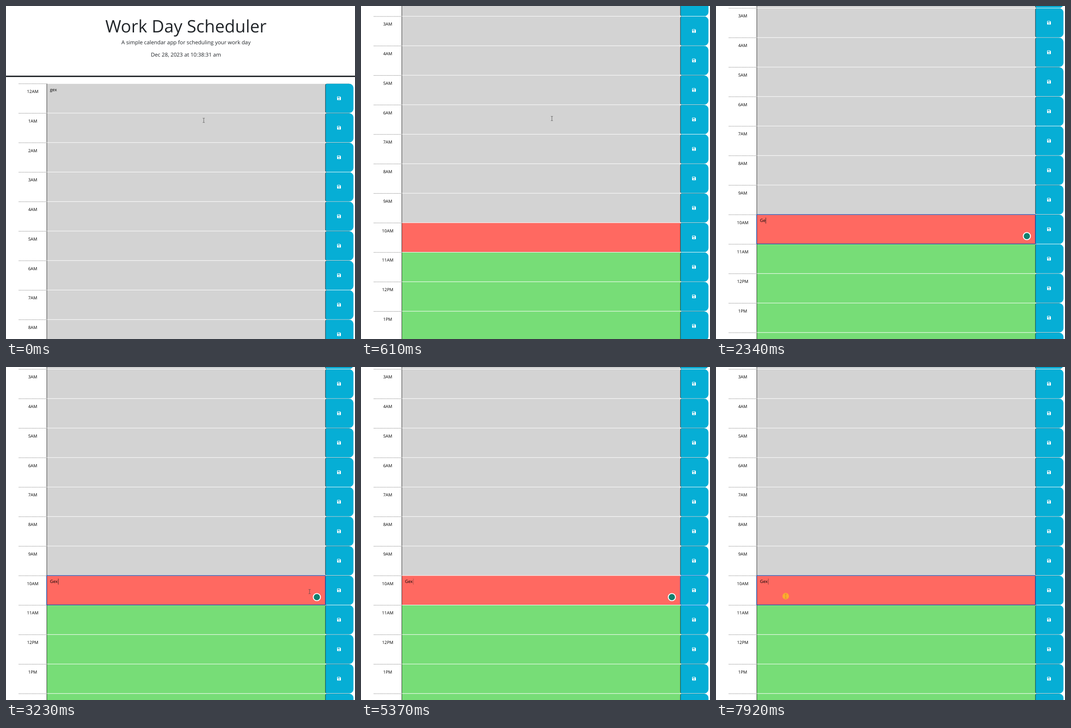
These frames come from a looping animation (766x731 px, 7.99 s). An HTML page:

```html
<!DOCTYPE html>
<html lang="en">
<head>
<meta charset="utf-8">
<title>Work Day Scheduler</title>
<style>
  html, body { margin: 0; width: 100%; height: 100%; overflow: hidden; background: #fff; }
  svg { display: block; width: 766px; height: 731px; }
  text { font-family: "Open Sans", "Noto Sans", sans-serif; font-size: 9.42px; text-rendering: geometricPrecision; }
  .head { fill: #212529; text-anchor: middle; font-size: 11.77px; }
  .title { font-size: 37.67px; }
  .hour { text-anchor: middle; }
</style>
</head>
<body>
<svg id="stage" viewBox="0 0 766 731" xmlns="http://www.w3.org/2000/svg"></svg>
<script>
const LOOP = 7990, STEP = 70;
const ROW_TOP = 170.3, ROW_H = 64.75, NOW = 10;
const LEFT = 28.2, AREA = 89.4, BTN = 700.7, RIGHT = 761.8;
const stage = document.getElementById('stage');

function add(parent, tag, attrs, text) {
  const el = document.createElementNS('http://www.w3.org/2000/svg', tag);
  for (const k in attrs) el.setAttribute(k, attrs[k]);
  if (text) el.textContent = text;
  parent.appendChild(el);
  return el;
}
const show = (el, on) => el.setAttribute('visibility', on ? 'visible' : 'hidden');
const move = (el, x, y) => el.setAttribute('transform', `translate(${x} ${y})`);

// Page header
const page = add(stage, 'g', {});
add(page, 'text', { class: 'head title', x: 395, y: 57.8 }, 'Work Day Scheduler');
add(page, 'text', { class: 'head', x: 395, y: 83.6 }, 'A simple calendar app for scheduling your work day');
const clock = add(page, 'text', { class: 'head', x: 395, y: 110.7 }, ' ');
add(page, 'rect', { x: 0, y: 152.9, width: 766, height: 3, fill: '#212529' });

// Hour rows
function buttonShape(y, h) {
  const l = 3.4, r = 8.8;
  return `M${BTN + l} ${y}H${RIGHT - r}a${r} ${r} 0 0 1 ${r} ${r}v${h - 2 * r}a${r} ${r} 0 0 1 ${-r} ${r}` +
    `H${BTN + l}a${l} ${l} 0 0 1 ${-l} ${-l}v${2 * l - h}a${l} ${l} 0 0 1 ${l} ${-l}z`;
}
const DISK = 'M-3.2-4.1H2.2L4.1-2.2V3.2a.9.9 0 0 1-.9.9H-3.2a.9.9 0 0 1-.9-.9V-3.2a.9.9 0 0 1 .9-.9z' +
  'M-2.9-2.9V-.7H1.7V-2.9zM0 .6a1.2 1.2 0 1 0 .01 0z';
const icons = [];
for (let i = 0; i < 16; i++) {
  const y = ROW_TOP + i * ROW_H;
  const fill = i < NOW ? '#d3d3d3' : i === NOW ? '#ff6961' : '#77dd77';
  const label = (i % 12 || 12) + (i < 12 ? 'AM' : 'PM');
  add(page, 'path', { d: `M${LEFT} ${y + .4}H${AREA}`, stroke: '#444', 'stroke-width': .8, 'stroke-dasharray': '1.6 1.6' });
  add(page, 'text', { class: 'hour', x: 58.6, y: y + 20.9 }, label);
  add(page, 'rect', { x: AREA, y, width: BTN - AREA + .6, height: ROW_H, fill });
  add(page, 'path', { d: `M${AREA} ${y}H${RIGHT}`, stroke: '#fff', 'stroke-width': 1 });
  add(page, 'rect', { x: AREA - .2, y, width: .9, height: ROW_H, fill: '#222' });
  add(page, 'path', { d: buttonShape(y + .5, ROW_H - .9), fill: '#111' });
  add(page, 'path', { d: buttonShape(y + .5, ROW_H - .9), fill: '#06aed5', transform: 'translate(.8 0)' });
  icons.push(add(page, 'path', { d: DISK, 'fill-rule': 'evenodd', fill: '#fff', transform: `translate(730.9 ${y + 32.2})` }));
}
add(page, 'text', { x: 96.4, y: ROW_TOP + 16.5 }, 'gex');

// Editing parts of the current hour
const nowY = ROW_TOP + NOW * ROW_H;
const entry = add(page, 'text', { x: 96.6, y: nowY + 16.5 });
const caret = add(page, 'rect', { y: nowY + 6.8, width: .9, height: 13, fill: '#222' });
const focus = add(page, 'rect', { x: AREA - .2, y: nowY, width: BTN - AREA + .6, height: ROW_H - .2, fill: 'none', stroke: '#1450b8', 'stroke-width': 1.3 });
const ring = add(page, 'path', { d: buttonShape(nowY - .7, ROW_H + 1.4), fill: 'none', stroke: '#3184fd', 'stroke-width': 2.4, opacity: .32 });
const badge = add(page, 'circle', { cx: 682.3, cy: nowY + 47.3, r: 7.9, fill: '#11806f', stroke: '#fff', 'stroke-width': 2 });

// Pointer
const pulse = add(stage, 'circle', { r: 7.2, fill: '#ffab2e' });
const beam = add(stage, 'path', { d: 'M-2.2-4.7H-.6L0-4.2.6-4.7H2.2M0-4.2V4.2M-2.2 4.7H-.6L0 4.2.6 4.7H2.2', fill: 'none', stroke: '#444', 'stroke-width': .8 });
const hand = add(stage, 'path', {
  d: 'M-2.4 1.5V-5.2a1.1 1.1 0 0 1 2.2 0V-1.6q1-.8 1.9.2 1-.6 1.6.3 1.5-.3 1.5 1.2V3q0 1.4-1 2.6V7H-1.6V6L-5 1.8q-.6-1.4.6-1.6 1.1.2 2 1.3z',
  fill: '#fff', stroke: '#222', 'stroke-width': .8
});

// Timelines: [start, value...]
const scrolls = [[0, 0], [540, 52.2], [610, 342], [680, 352], [750, 357], [820, 360]];
const typed = [[0, ''], [1920, 'G'], [2200, 'Ge'], [2470, 'Gex']];
const paths = [
  [[0, 434, 251], [70, 427, 249], [140, 419, 247], [820, 419, 247], [1300, 138, 473], [1640, 138, 473]],
  [[2470, 138, 473], [2740, 138, 473], [3160, 627, 494], [3370, 745, 491], [3570, 745, 491], [3710, 719, 496],
   [4320, 719, 496], [4530, 654, 461], [4740, 600, 219], [4810, 600, 219]],
  [[6820, 238, 199], [7160, 160, 516], [7300, 128, 508], [7440, 169, 506], [7580, 153, 503], [LOOP, 153, 503]]
];
const caretX = { '': 96.8, G: 103.6, Ge: 108.8, Gex: 114.4 };

const current = (list, t) => list.filter(k => k[0] <= t).pop();
const between = (t, a, b) => t >= a && t < b;

function pointerAt(t) {
  const path = paths.find(p => between(t, p[0][0], p[p.length - 1][0]));
  if (!path) return null;
  const i = path.findIndex(k => k[0] > t), a = path[i - 1], b = path[i];
  const u = Math.floor((t - a[0]) / STEP) * STEP / (b[0] - a[0]);
  return [a[1] + (b[1] - a[1]) * u, a[2] + (b[2] - a[2]) * u];
}

function draw(t) {
  move(page, 0, -current(scrolls, t)[1]);
  clock.textContent = `Dec 28, 2023 at 10:38:${t < 340 ? 31 : 32} am`;

  const word = current(typed, t)[1];
  entry.textContent = word;
  caret.setAttribute('x', caretX[word]);
  caret.setAttribute('opacity', t < 4110 ? 1 : t < 7650 ? .4 : .65);
  show(caret, t >= 1440);
  show(focus, between(t, 1370, 4110) || t >= 7650);
  show(ring, between(t, 4250, 6490));
  show(badge, between(t, 1780, 6490));

  const p = pointerAt(t);
  const onButton = !!p && p[0] > BTN && p[0] < RIGHT;
  show(beam, p && !onButton);
  show(hand, onButton);
  show(pulse, between(t, 1370, 1640) || t >= 7650);
  icons[NOW].setAttribute('fill', onButton ? '#212529' : '#fff');
  if (p) {
    move(beam, p[0], p[1]);
    move(hand, p[0], p[1]);
    move(pulse, p[0], p[1]);
  }
  beam.setAttribute('stroke', between(t, 1370, 1640) || t >= 7650 ? '#b98a3c' : '#444');
}

function tick() {
  draw(performance.now() % LOOP);
  requestAnimationFrame(tick);
}
tick();
</script>
</body>
</html>
```
